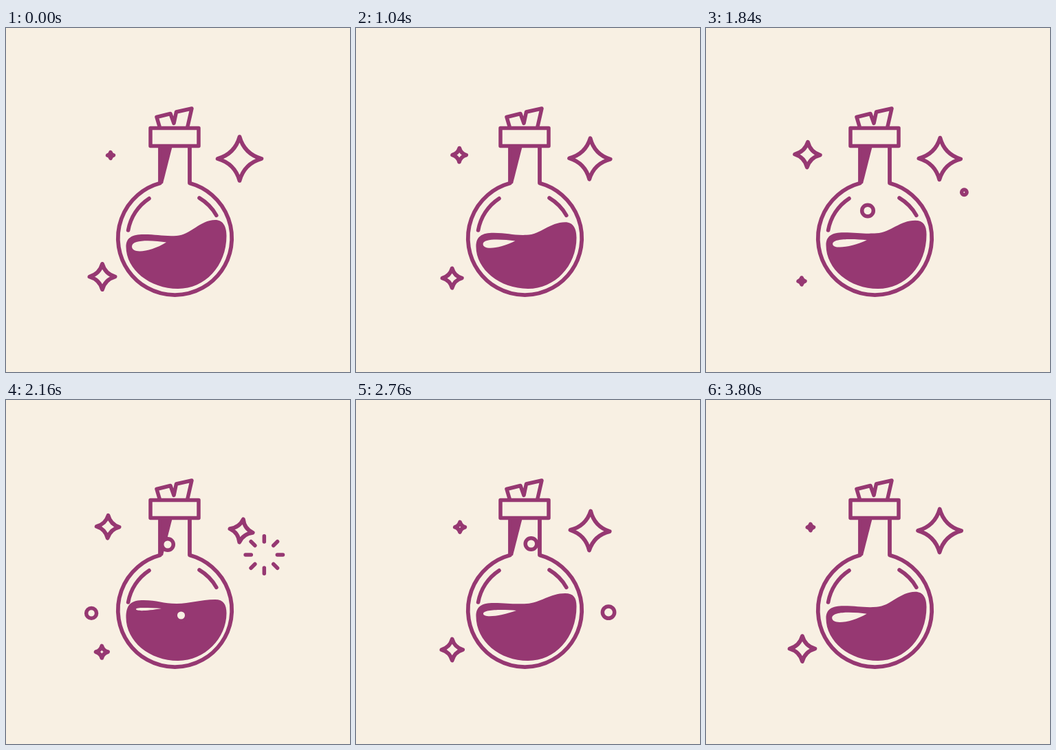
These frames come from a looping animation (500 by 500 pixels, 3.84 s). An HTML page with a canvas:

```html
<!DOCTYPE html>
<html lang="en">
<head>
<meta charset="utf-8">
<title>Potion</title>
<style>
  html, body { margin: 0; width: 100%; height: 100%; overflow: hidden; background: #f8f0e3; }
  canvas { display: block; width: 500px; height: 500px; }
</style>
</head>
<body>
<canvas width="500" height="500"></canvas>
<script>
const INK = '#963872', PAPER = '#f8f0e3';
const STEP = 40, STEPS = 96, SLOSH = 24;
const ctx = document.querySelector('canvas').getContext('2d');
ctx.lineCap = ctx.lineJoin = 'round';

// Liquid poses: [step, left side, left top, middle, right top, right side, middle slope,
//                glint left x, glint left y, glint tip x, glint tip y, glint thickness]
const POSES = [
  [0, 318, 300, 302, 279, 302, -.05, 183, 317.5, 233, 311.5, 11],
  [6, 316, 291, 296, 290, 310, 0, 189, 304, 226, 303, 3],
  [14, 312, 283.5, 288.5, 296, 312, .14, 194, 295, 205, 295, 0],
  [16, 308, 286.5, 287.5, 289.5, 308, .04, 188, 296.5, 222, 296.5, 1.8],
  [21, 314, 295, 296, 281, 300, -.06, 185, 310.5, 233, 306, 6.5]
];

// Bubbles in the flask: [x, step at reference height, rate, end of rise]
const RISING = [[295, 11, 1, 9], [280, 16, 1, 9], [218, 35.4, 1, 6.5], [235, 40.4, 1.09, 99], [254.5, 54, 1, 99]];
// Bubbles outside: [first step, burst x, burst y, sideways drift]
const POPPING = [[1, 367, 300, 0], [11, 130, 260, 1.5], [43, 375.3, 225, 0], [48, 122.3, 303, .6], [62, 367, 304, 0]];

function paint(path, fill, width) {
  const shape = new Path2D(path);
  if (fill) { ctx.fillStyle = fill; ctx.fill(shape); }
  if (width) { ctx.strokeStyle = INK; ctx.lineWidth = width; ctx.stroke(shape); }
}

// 1 at both ends of the period, 0 at the turn, eased between
function swing(step, period, turn) {
  const p = step % period;
  const k = p < turn ? p / turn : (period - p) / (period - turn);
  return (1 + Math.cos(Math.PI * k)) / 2;
}

// Smooth periodic interpolation through the poses
function poseAt(step) {
  const p = step % SLOSH, n = POSES.length;
  const key = i => {
    const turn = Math.floor(i / n), pose = POSES[i - turn * n];
    return [pose[0] + turn * SLOSH, ...pose.slice(1)];
  };
  let i = n - 1;
  while (POSES[i][0] > p) i--;
  const [a, b, c, d] = [i - 1, i, i + 1, i + 2].map(key);
  const h = c[0] - b[0], u = (p - b[0]) / h, u2 = u * u, u3 = u2 * u;
  return b.slice(1).map((v, j) => {
    const w = c[j + 1];
    const m = (w - a[j + 1]) / (c[0] - a[0]) * h;
    const q = (d[j + 1] - v) / (d[0] - b[0]) * h;
    return (2 * u3 - 3 * u2 + 1) * v + (u3 - 2 * u2 + u) * m + (3 * u2 - 2 * u3) * w + (u3 - u2) * q;
  });
}

function liquid(step) {
  const [left, a, mid, b, right, slope, gx, gy, tx, ty, thick] = poseAt(step);
  paint(`M174.5 ${left} C174.5 ${a + 5} 183 ${a} 200 ${a}
    C220 ${a} 228 ${mid - 20 * slope} 248 ${mid} C268 ${mid + 20 * slope} 282 ${b} 304 ${b}
    C316 ${b} 320.5 ${right - 13} 320.5 ${right}
    C320.5 346 289 379 250 379 C209 379 174.5 351 174.5 ${left}Z`, INK);
  if (thick > .3) {
    paint(`M${tx} ${ty} C${tx - 18} ${ty - thick * .25} ${gx} ${gy - thick} ${gx} ${gy}
      C${gx} ${gy + thick * 1.1} ${tx - 21} ${ty + thick * 1.2} ${tx} ${ty}Z`, PAPER);
  }
}

function ring(x, y, r) {
  ctx.beginPath();
  ctx.arc(x, y, r, 0, 7);
  ctx.fillStyle = PAPER;
  ctx.fill();
  ctx.lineWidth = 5.5;
  ctx.strokeStyle = INK;
  ctx.stroke();
}

function burst(x, y, k) {
  const inner = 13 + 15 * k, outer = 25 + 5.5 * k;
  let path = '';
  for (let i = 0; i < 8; i++) {
    const c = Math.cos(i * Math.PI / 4), s = Math.sin(i * Math.PI / 4);
    path += `M${x + c * inner} ${y + s * inner}L${x + c * outer} ${y + s * outer}`;
  }
  paint(path, null, 5.5);
}

function star(x, y, size, degrees) {
  const r = size - 2.9, c = r * .22;
  ctx.save();
  ctx.translate(x, y);
  ctx.rotate(degrees * Math.PI / 180);
  paint(`M0 ${-r}Q${c} ${-c} ${r} 0Q${c} ${c} 0 ${r}Q${-c} ${c} ${-r} 0Q${-c} ${-c} 0 ${-r}Z`, PAPER, 5.8);
  ctx.restore();
}

function draw(step) {
  ctx.fillStyle = PAPER;
  ctx.fillRect(0, 0, 500, 500);

  // Flask
  paint('M224 171H242L228 226H224Z', INK);
  paint('M224 171V225.5A82.7 82.7 0 1 0 267 225.5V171', null, 5.8);
  liquid(step);
  paint('M208 247.8A69.3 69.3 0 0 0 177.6 294M281 247A69.3 69.3 0 0 1 305.8 272.3', null, 5.6);

  for (const [x, start, rate, end] of RISING) {
    const s = (step - start) * rate;
    const r = 8.3 * Math.min(1, (s + 6) / 3.4, (end - s) / 5);
    if (r > 0 && s < 27) ring(x, 313 - 8.35 * s + .0944 * s * s, r);
  }

  // Cork
  paint('M223 143L219 129.5L239 124.5L244 138.5L247.5 122L270 117L264 143', PAPER, 5.5);
  paint('M210 145.5H280V171.5H210Z', PAPER, 5.5);

  const big = swing(step, 24, 11), top = 1 - swing(step, 32, 17.5), low = swing(step, 32, 16);
  star(344 - 4.5 * big, 190, 8.5 + 26.3 * big, 17 * (1 - big));
  star(152 - 5 * top, 185 - top, 7.2 + 15.6 * top, 2 * top);
  star(139 + low, 368.2 - 6.7 * low, 7.2 + 14.3 * low, 0);

  for (const [start, x, y, drift] of POPPING) {
    const age = step - start, left = 9 - age;
    if (age <= 0 || age >= 15) continue;
    if (left > 0) ring(x + left * drift, y + left * 2.3, Math.min(8.7, 1.24 * age));
    else burst(x, y, -left / 5);
  }
}

function tick() {
  draw(Math.floor(performance.now() / STEP) % STEPS);
  requestAnimationFrame(tick);
}
tick();
</script>
</body>
</html>
```
